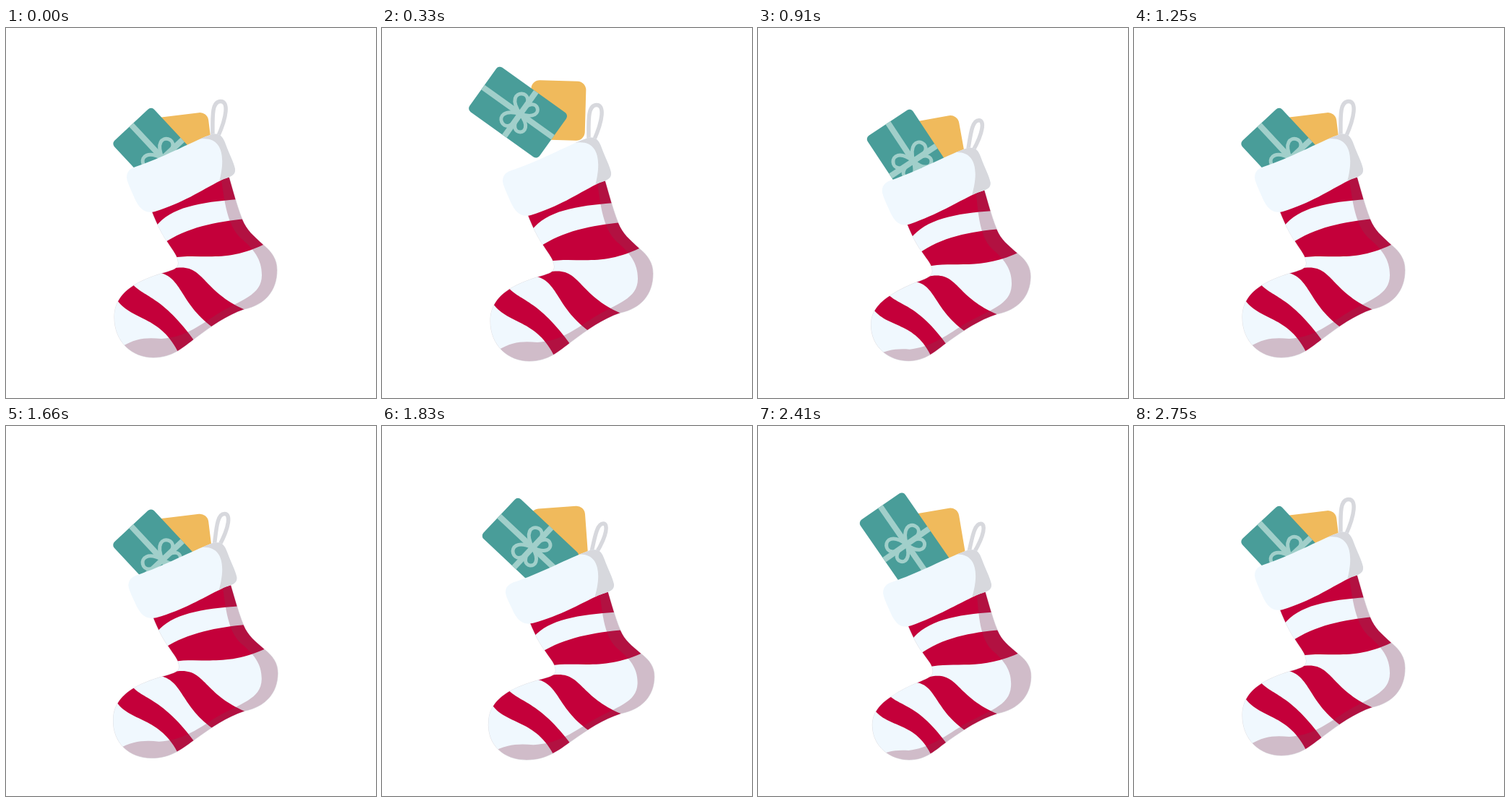
An HTML page with a canvas that plays this animation: 512x512 px, repeating every 3.25 s.

```html
<!DOCTYPE html>
<html lang="en">
<head>
<meta charset="utf-8">
<title>Christmas stocking</title>
<style>
html, body { margin: 0; width: 100%; height: 100%; overflow: hidden; background: #fff; }
canvas { display: block; width: 100vw; height: 100vh; }
</style>
</head>
<body>
<canvas id="stage" width="512" height="512"></canvas>
<script>
const ctx = document.getElementById('stage').getContext('2d');
const LOOP = 3250, FPS = 12, SECOND_HOP = 19;
const RED = '#c4003a', WHITE = '#f0f8fe', GREY = '#d7d8dd', SHADE = 'rgba(137,57,80,.31)';
const TEAL = '#499d99', RIBBON = '#a1cfca', YELLOW = '#f0ba5c';

// A start point followed by Bezier triples.
const points = text => text.trim().split(/\s+/).map(p => p.split(',').map(Number));

const sock = points(`195,235 203,258 212,280 224,297 231,308 238,316 238.5,325
  239,333 230,335 221,338 207,342 190,348 177,356 161,366 150,380 150,400
  150,435 175,456 204,456 230,456 245,442 262,429 285,412 304,398 330,389
  358,383 375,364 375,335 375,320 368,310 356,300 343,288 333,280 327,265
  318,243 312,215 302,185`);
const cuff = points(`167,207 167,196 175,193 185,190 222,177 262,155 285,147
  296,145 300,150 304,161 309,175 315,185 317,195 318,206 307,206 297,211
  268,226 245,242 206,254 190,258 184,247 179,238 174,226 168,215 167,207`);
const strap = points('286,150 286,125 284,101.5 297,101.5 308,101.5 306,122 293,151');
const stripes = [
  ['195,235 240,215 280,205 325,190', '207,275 228,248 268,241 322,237'],
  ['218,298 250,276 290,268 332,264', '230,318 270,311 304,327 362,297'],
  ['230,333 276,323 268,365 336,392', '210,338 245,344 240,383 290,417'],
  ['172,351 190,374 215,368 263,436', '152,374 172,406 214,396 240,452']
].map(pair => pair.map(points));
const sockShade = points(`295,190 302,235 304,270 324,290 343,306 354,320 354,342
  354,370 325,376 292,396 262,416 245,428 215,430 195,428 180,429 160,441`);
const cuffShade = points('262,155 300,145 306,178 293,220');

const gifts = [
  { rest: [246, 161, -7], top: [243, 103.5, 3.5], landing: 9.4, spin: -4.5, draw: yellowGift },
  { rest: [214, 177.6, 47], top: [182.3, 103, 33], landing: 9.73, spin: 13, draw: tealGift }
];

const clamp = v => Math.min(1, Math.max(0, v));
const sigmoid = v => 1 / (1 + Math.exp(-2.5 * v));
const bump = (t, from, length, skew) => Math.sin(Math.PI * clamp((t - from) / length) ** skew);

// How far the stocking is crouched before the jump, squashed by the landing, and sunk.
const poseAt = t => ({
  crouch: 1.2 * bump(t, 0, 4, 1.3),
  land: bump(t, 8.5, 5.5, .533) ** 2,
  drop: 5 * bump(t, 3, 3, .63)
});

function warper({ crouch, land, drop }) {
  const squash = crouch + land;
  return ([x, y]) => {
    const leg = clamp((456 - y) / 256), foot = 1 - leg;
    const toe = clamp((250 - x) / 80), loop = Math.max(0, (150 - y) / 50);
    const dx = leg * (4 * crouch + 6 * land) + toe * (9 * foot * land - 7 * foot ** 3 * crouch)
      + loop * squash * (6 - .35 * (x - 295));
    const dy = squash * (6 + 18 * leg ** 1.4 + 10 * loop) + 36 * toe * leg * foot * land;
    return [x + dx, y + dy + drop];
  };
}

function shape(warp, ...parts) {
  const path = new Path2D();
  for (const part of parts) {
    const pts = part.map(warp);
    path.lineTo(...pts[0]);
    for (let i = 1; i < pts.length; i += 3) path.bezierCurveTo(...pts.slice(i, i + 3).flat());
  }
  return path;
}

function fill(path, color) {
  ctx.fillStyle = color;
  ctx.fill(path);
}

function clipped(path, draw) {
  ctx.save();
  ctx.clip(path);
  draw();
  ctx.restore();
}

function placed(x, y, deg, draw) {
  ctx.save();
  ctx.translate(x, y);
  ctx.rotate(deg * Math.PI / 180);
  draw();
  ctx.restore();
}

function box(w, h, r, color) {
  const path = new Path2D();
  path.roundRect(-w / 2, -h / 2, w, h, r);
  fill(path, color);
}

function petal(deg, length, width) {
  placed(0, 0, deg, () => {
    const reach = length / .75;
    ctx.beginPath();
    ctx.moveTo(0, 0);
    ctx.bezierCurveTo(reach, -width, reach, width, 0, 0);
    ctx.stroke();
  });
}

function yellowGift() {
  box(76, 82, 12, YELLOW);
}

function tealGift() {
  box(119, 75.4, 6, TEAL);
  ctx.fillStyle = ctx.strokeStyle = RIBBON;
  ctx.fillRect(-59.5, -4, 119, 8);
  ctx.fillRect(0, -37.7, 8, 75.4);
  ctx.lineWidth = 5;
  placed(4, 0, 0, () => {
    for (const side of [-1, 1]) {
      petal(121 * side, 28, 31);
      petal(55 * side, 25, 26);
    }
    box(9, 9, 4.5, RIBBON);
  });
}

function drawGift({ rest, top, landing, spin, draw }, t, { crouch, land }) {
  const lift = sigmoid(t - 3.4) - sigmoid(t - landing);
  const [x, y, deg] = rest.map((v, i) => v + (top[i] - v) * lift);
  placed(x, y + 8 * (crouch + land), deg + spin * land, draw);
}

function drawSock(pose) {
  const { crouch, land } = pose, warp = warper(pose);
  // Shadow edges slide a little over the squashed cloth.
  const slide = p => {
    const [x, y] = warp(p), foot = 1 - clamp((456 - p[1]) / 256);
    return [x - foot * (4 * crouch + 12 * land), y + foot * (5 * crouch + 12 * land)];
  };
  const slideCuff = p => {
    const [x, y] = warp(p);
    return [x - 4 * (crouch + land), y];
  };

  ctx.strokeStyle = GREY;
  ctx.lineWidth = 5.5;
  ctx.stroke(shape(warp, strap));

  const body = shape(warp, sock);
  ctx.strokeStyle = 'rgba(90,90,110,.35)';
  ctx.lineWidth = .6;
  ctx.stroke(body);
  fill(body, WHITE);
  clipped(body, () => {
    for (const [upper, lower] of stripes) fill(shape(warp, upper, [...lower].reverse()), RED);
    fill(shape(slide, sockShade, [[150, 480]], [[420, 480]], [[420, 190]]), SHADE);
  });

  const top = shape(warp, cuff);
  fill(top, WHITE);
  clipped(top, () => fill(shape(slideCuff, cuffShade, [[350, 235]], [[350, 130]], [[262, 140]]), GREY));
}

function draw(now) {
  const step = Math.floor((now % LOOP + 7) * FPS / 1000);
  const t = step < SECOND_HOP ? step : step - SECOND_HOP;
  const pose = poseAt(t);
  ctx.fillStyle = '#fff';
  ctx.fillRect(0, 0, 512, 512);
  gifts.forEach(gift => drawGift(gift, t, pose));
  drawSock(pose);
}

const start = performance.now();
function tick() {
  draw(performance.now() - start);
  requestAnimationFrame(tick);
}
tick();
</script>
</body>
</html>
```
